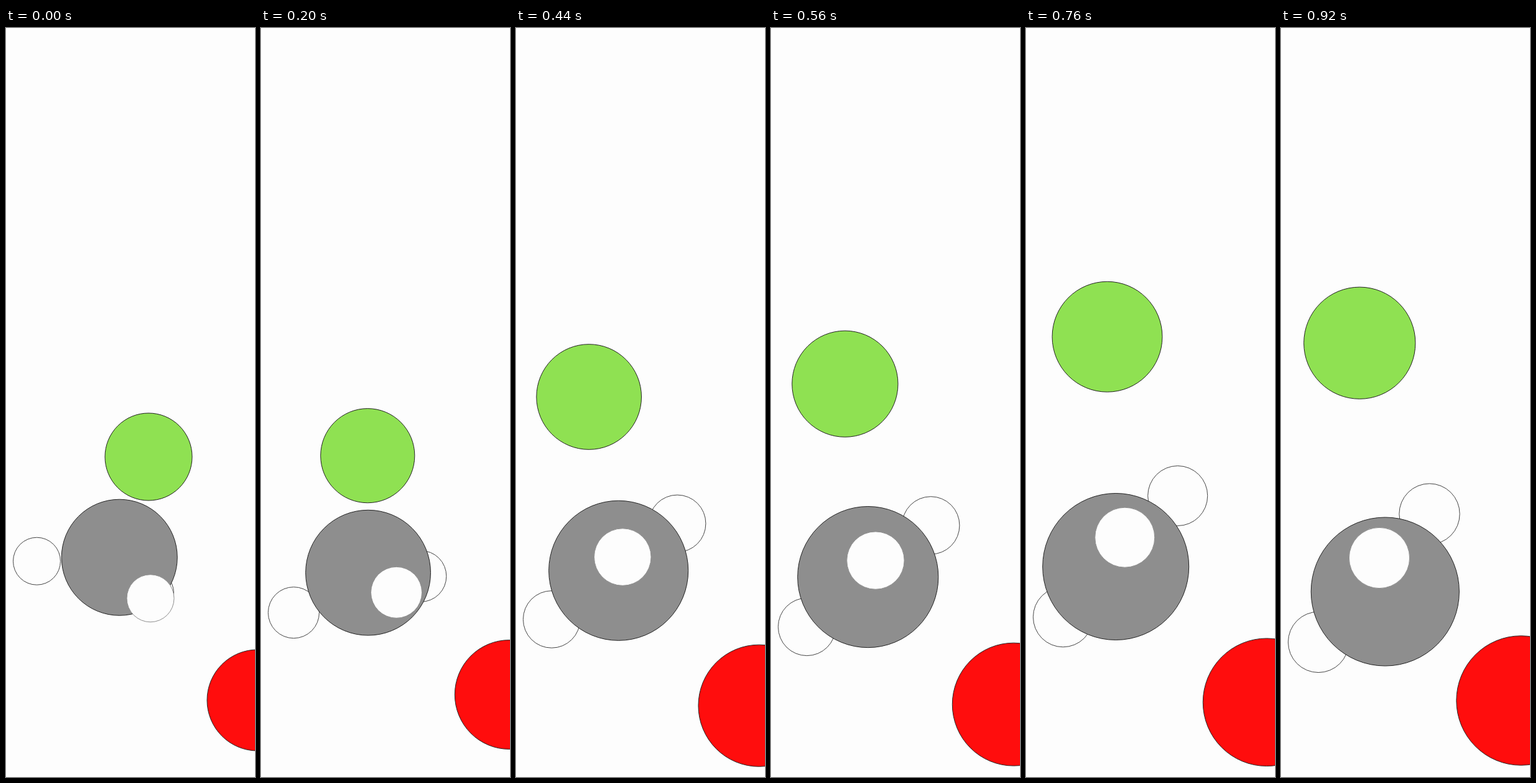
An HTML page for the animation above (960 ms loop, 400 by 1200 pixels).

```html
<!DOCTYPE html>
<html lang="en">
<head>
<meta charset="utf-8">
<title>Circles</title>
<style>
  html, body { margin: 0; width: 100%; height: 100%; overflow: hidden; background: #fdfdfd; }
  svg { display: block; width: 100%; height: 100%; }
</style>
</head>
<body>
<svg id="stage" viewBox="0 0 400 1200"></svg>
<script>
const LOOP = 960, STEP = 40, WALL = 11.5;
const PAPER = '#fdfdfd', GRAY = '#8e8e8e', INK = '#222', THIN = '#444';

// Key points: time, then the values reached at that time.
const progress = [[0, 0], [360, 0.51], [440, 0.73], [560, 0.77], [760, 0.94], [920, 1]];
const bodyPath = [
  [0, 182.2, 848.2], [360, 164, 892.3], [440, 164.7, 869.3],
  [560, 155.8, 879.6], [760, 144.2, 863], [920, 167.3, 903]
];
const greenPath = [
  [0, 229, 687], [200, 171.3, 685.2], [360, 123.7, 650], [440, 117.2, 591],
  [560, 118.9, 570.2], [760, 130.5, 494.7], [920, 126.3, 504.7]
];
const redHeight = [[0, 1077], [200, 1068], [360, 1071], [440, 1085.7], [920, 1077.5]];

const stage = document.getElementById('stage');

function setAttrs(el, attrs) {
  for (const key in attrs) el.setAttribute(key, attrs[key]);
}

function circle(r, fill, stroke) {
  const el = document.createElementNS(stage.namespaceURI, 'circle');
  setAttrs(el, { fill, stroke, 'stroke-width': 1 });
  stage.appendChild(el);
  return { el, r };
}

// Painted back to front.
const corner = circle(38, PAPER, THIN);
const red = circle(81, '#ff0d0d', INK);
const left = circle(38, PAPER, THIN);
const right = circle(38, PAPER, THIN);
const green = circle(70, '#8fe152', INK);
const body = circle(93, GRAY, INK);
const hole = circle(38, PAPER, GRAY);

function along(keys, t) {
  let i = 1;
  while (i < keys.length - 1 && t >= keys[i][0]) i++;
  const [t0, ...from] = keys[i - 1], [t1, ...to] = keys[i];
  const k = Math.min(1, (t - t0) / (t1 - t0));
  return from.map((v, n) => v + (to[n] - v) * k);
}

const smooth = k => k * k * (3 - 2 * k);

function draw(t) {
  const [p] = along(progress, t);
  const grow = 1 + 0.28 * p;
  const place = (c, x, y) => setAttrs(c.el, { cx: x, cy: y, r: c.r * grow });

  const [bx, by] = along(bodyPath, t);
  place(body, bx, by);
  place(green, ...along(greenPath, t));

  const rx = 404 - 18.5 * p;
  const [ry] = along(redHeight, t);
  place(red, rx, ry);
  // Peeks out below the red circle for a moment.
  place(corner, rx + 18.5, ry + 72 * Math.sin(Math.PI * t / 720) ** 8);

  // The pale circles swing around the body; one stays on the left wall.
  place(left, WALL + left.r * grow, by + 81 - 75 * Math.exp(-t / 135));
  place(right, 231.5 + 7 * p + 30 * Math.sin(Math.PI * p), by + 57 - 181.4 * p);
  place(hole, 232 - 74 * smooth(p), by + 65.5 - 119.5 * p);
}

const start = performance.now();

function tick() {
  const t = (performance.now() - start) % LOOP;
  draw(Math.floor(t / STEP) * STEP);
  requestAnimationFrame(tick);
}

tick();
</script>
</body>
</html>
```
